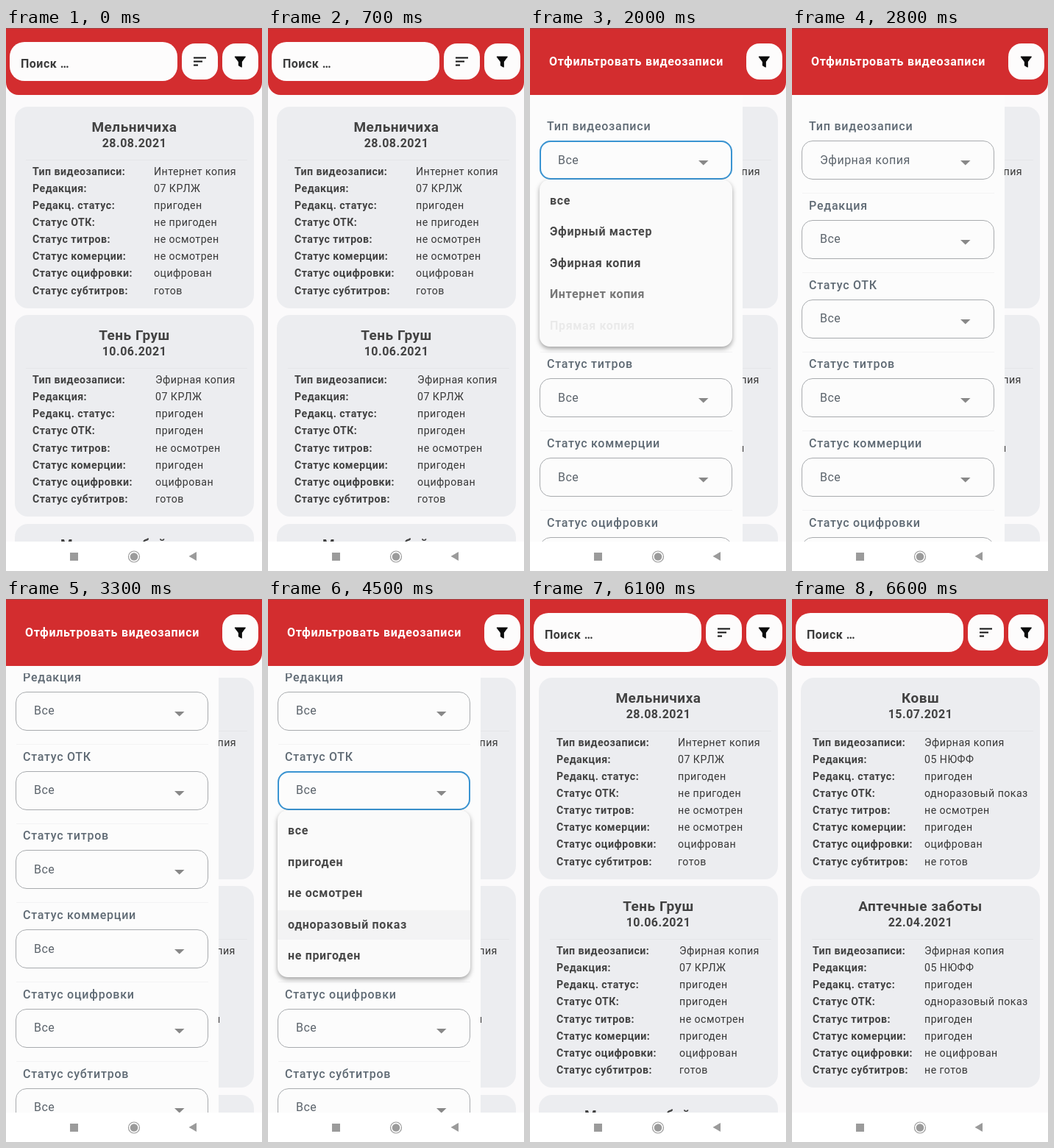
These frames come from a looping animation (348x738 px, 6.7 s). An HTML page:

```html
<!DOCTYPE html>
<html lang="ru">
<head>
<meta charset="utf-8">
<title>Фильтр видеозаписей</title>
<style>
:root { --t: 0ms; }
* { box-sizing: border-box; }
html, body { margin: 0; width: 100%; height: 100%; overflow: hidden; background: #fff; }
body { position: relative; font: 16px/20px Roboto, "Noto Sans", sans-serif; letter-spacing: .5px; color: #424242; }
div, span, svg { position: absolute; white-space: nowrap; }
b { font-weight: 700; }

.screen { left: 0; top: 0; width: 348px; height: 698px; overflow: hidden; background: #fbfafb; }
.bar { left: 0; top: 0; width: 348px; height: 91px; background: #d32d2f; border-radius: 0 0 17px 17px; }
.search { left: 5px; top: 19px; width: 228px; height: 53px; border-radius: 20px; background: #fdfcfc; }
.search span { left: 15px; top: 20px; font-weight: 700; color: #3c3c3c; }
.btn { top: 21px; width: 49px; height: 49px; border-radius: 18px; background: #fdfcfc; }
.edge { left: 0; top: 0; width: 348px; height: 1px; background: #9c4648; }

.list { left: 0; top: 0; width: 348px; height: 698px; }
.card { left: 12px; width: 325px; height: 274px; border-radius: 18px; background: #ecedf0; }
.card .name, .card .date { left: 0; width: 325px; text-align: center; font-weight: 700; }
.card .name { top: 18px; font-size: 19px; }
.card .date { top: 40px; }
.card .rule { left: 15px; top: 72px; width: 301px; height: 1px; background: #e5e6e9; }
.row { left: 0; font-size: 14.2px; letter-spacing: .45px; }
.row b { position: absolute; left: var(--a); }
.row span { left: var(--b); color: #383838; }

.drawer { left: 0; top: 0; width: 289px; height: 698px; background: #fcfcfc; }
.head { left: 0; top: 0; width: 289px; height: 91px; background: #d32d2f; color: #fff;
  font-weight: 700; letter-spacing: .7px; line-height: 92px; text-align: center; }
.view { left: 0; top: 101px; width: 289px; height: 597px; overflow: hidden; }
.form { left: 0; top: -101px; width: 289px; height: 960px; }
.field { left: 0; width: 289px; height: 107px; }
.label { left: 23px; top: -9px; font-weight: 500; letter-spacing: .75px; color: #5f6a74; }
.select { left: 13px; top: 20px; width: 262px; height: 53px; border: 1px solid #a8abae; border-radius: 15px; color: #5c646c; }
.select span { left: 24px; top: 15.5px; }
.select svg { left: 215px; top: 26px; }
.ring { inset: -1px; border: 2px solid #3a94d2; border-radius: 15px; }
.line { left: 14px; top: 91px; width: 261px; height: 1px; background: #f3f3f4; }
.menu { left: 13px; top: 73px; width: 262px; height: 227px; border-radius: 14px; background: #fafafa;
  box-shadow: 0 3px 6px rgba(0,0,0,.36); overflow: hidden; }
.item { left: 0; width: 262px; height: 42px; }
.item span { left: 14px; top: 11px; font-weight: 700; letter-spacing: .65px; color: #484848; }
.press { inset: 1px 0; background: #f3f3f4; }
.apply { left: 13px; top: 884px; width: 262px; height: 53px; border-radius: 6px; background: #c92427; color: #fff;
  font-weight: 700; letter-spacing: 1.6px; line-height: 53px; text-align: center; box-shadow: 0 1px 2px rgba(0,0,0,.35); }
.nav { left: 0; top: 698px; width: 348px; height: 40px; background: #fff; }

/* One paused 6.7 s cycle, positioned by --t; --s shifts a part, --lag staggers menu items */
.drawer, .form, .menu, .ring, .item span, .press, .before, .after, .found, .all {
  animation: 6.7s linear infinite paused both;
  animation-delay: calc(var(--t) + var(--s, 0ms) + var(--lag, 0ms));
}
.drawer { animation-name: drawer; }
.form { animation-name: scroll; }
.menu { animation-name: menu; }
.ring { animation-name: ring; }
.item span { animation-name: item; }
.press { animation-name: press; }
.before { animation-name: before; }
.after { animation-name: after; }
.all { animation-name: all; }
.found { animation-name: found; }

@keyframes drawer {
  0%, 10.76% { transform: translateY(100%); animation-timing-function: cubic-bezier(0,0,.2,1); }
  14.49%, 88.06% { transform: none; animation-timing-function: cubic-bezier(.8,0,1,1); }
  91.04%, 100% { transform: translateY(100%); }
}
@keyframes scroll {
  0%, 41.8% { transform: none; animation-timing-function: ease-out; }
  48.5%, 72.4% { transform: translateY(-135px); animation-timing-function: ease-out; }
  78.3%, 100% { transform: translateY(-303px); }
}
@keyframes menu {
  0%, 25.82% { opacity: 0; height: 42px; }
  26.94% { opacity: 1; height: 42px; animation-timing-function: ease; }
  28.06%, 37.31% { opacity: 1; height: 227px; }
  38.43%, 100% { opacity: 0; height: 227px; }
}
@keyframes ring {
  0%, 25.8% { opacity: 0; }
  25.82%, 37.3% { opacity: 1; }
  37.31%, 100% { opacity: 0; }
}
@keyframes item {
  0%, 28.43% { opacity: 0; }
  28.96%, 100% { opacity: 1; }
}
@keyframes press {
  0%, 34.5% { opacity: 0; }
  35.7%, 100% { opacity: 1; }
}
@keyframes before { 0%, 37.3% { opacity: 1; } 37.31%, 100% { opacity: 0; } }
@keyframes after { 0%, 37.3% { opacity: 0; } 37.31%, 100% { opacity: 1; } }
@keyframes all { 0%, 95.4% { opacity: 1; } 95.5%, 100% { opacity: 0; } }
@keyframes found { 0%, 95.4% { opacity: 0; } 95.5%, 100% { opacity: 1; } }
</style>
</head>
<body>
<div class="screen">
  <div class="list all"></div>
  <div class="list found"></div>
  <div class="bar">
    <div class="search"><span>Поиск …</span></div>
    <div class="btn" style="left:239px"></div>
    <div class="btn" style="left:294px"></div>
    <svg width="348" height="91" style="left:0;top:0">
      <path d="M255 40.5h17M255 45.5h12M255 50.5h6" stroke="#111" stroke-width="2"/>
      <path d="M311 39h14.5l-5.2 7v7.2l-4-2.2v-5z" fill="#0b0b0b" stroke="#0b0b0b" stroke-linejoin="round"/>
    </svg>
  </div>
  <div class="drawer">
    <div class="head">Отфильтровать видеозаписи</div>
    <div class="view"><div class="form"><div class="apply">Применить фильтры</div></div></div>
  </div>
  <div class="edge"></div>
</div>
<div class="nav">
  <svg width="348" height="40" style="left:0;top:0" fill="#9b9b9b">
    <path d="M87 15h11v11h-11zM259 14v12l-10.5-6z"/>
    <circle cx="174" cy="20.5" r="5.3"/>
    <circle cx="174" cy="20.5" r="7.5" fill="none" stroke="#9b9b9b" stroke-width="1.2"/>
  </svg>
</div>
<script>
const $ = s => document.querySelector(s);
const add = (parent, html) => parent.insertAdjacentHTML("beforeend", html);

const rowNames = ["Тип видеозаписи", "Редакция", "Редакц. статус", "Статус ОТК",
  "Статус титров", "Статус комерции", "Статус оцифровки", "Статус субтитров"];

function card(list, n, name, date, a, b, values) {
  const rows = values.map((v, i) =>
    `<div class="row" style="top:${78 + 23.15 * i}px"><b>${rowNames[i]}:</b><span>${v}</span></div>`).join("");
  add(list, `<div class="card" style="top:${106.5 + 283.5 * n}px;--a:${a - 12}px;--b:${b - 12}px">
    <div class="name">${name}</div><div class="date">${date}</div><div class="rule"></div>${rows}</div>`);
}

const ok = "пригоден", unseen = "не осмотрен", once = "одноразовый показ";
const all = $(".all"), found = $(".found");
card(all, 0, "Мельничиха", "28.08.2021", 36, 201,
  ["Интернет копия", "07 КРЛЖ", ok, "не пригоден", unseen, unseen, "оцифрован", "готов"]);
card(all, 1, "Тень Груш", "10.06.2021", 36, 203,
  ["Эфирная копия", "07 КРЛЖ", ok, ok, unseen, ok, "оцифрован", "готов"]);
card(all, 2, "Маленькие байдарки", "", 36, 201, []);
card(found, 0, "Ковш", "15.07.2021", 28, 180,
  ["Эфирная копия", "05 НЮФФ", ok, once, unseen, ok, "оцифрован", "не готов"]);
card(found, 1, "Аптечные заботы", "22.04.2021", 28, 180,
  ["Эфирная копия", "05 НЮФФ", ok, once, ok, ok, "не оцифрован", "не готов"]);

// Fields with a menu: options, index of the chosen one, time shift
const menus = {
  0: [["все", "Эфирный мастер", "Эфирная копия", "Интернет копия", "Прямая копия"], 2, 0],
  2: [["все", ok, unseen, once, "не пригоден"], 3, 2100]
};

function menuHtml([options, pick]) {
  return `<div class="menu">` + options.map((o, i) =>
    `<div class="item" style="top:${7.5 + 42.6 * i}px">${i === pick ? '<div class="press"></div>' : ""}
     <span style="--lag:${23 * i}ms">${o}</span></div>`).join("") + `</div>`;
}

["Тип видеозаписи", "Редакция", "Статус ОТК", "Статус титров", "Статус коммерции",
  "Статус оцифровки", "Статус субтитров"].forEach((label, i) => {
  const menu = menus[i];
  const value = menu
    ? `<span class="before">Все</span><span class="after">${menu[0][menu[1]]}</span><div class="ring"></div>`
    : "<span>Все</span>";
  // Earlier fields stack on top, so an open menu covers the ones below
  add($(".form"), `<div class="field" style="top:${133 + 107.75 * i}px;--s:${menu ? menu[2] : 0}ms;z-index:${9 - i}">
    <div class="label">${label}</div>
    <div class="select">${value}<svg width="14" height="7"><path d="M0 0h13.5l-6.75 6.5z" fill="#888"/></svg></div>
    ${i < 6 ? '<div class="line"></div>' : ""}${menu ? menuHtml(menu) : ""}</div>`);
});

// The screen refreshes ten times a second
function tick() {
  const t = Math.floor(performance.now() % 6700 / 100) * 100;
  document.documentElement.style.setProperty("--t", -t + "ms");
  requestAnimationFrame(tick);
}
tick();
</script>
</body>
</html>
```
